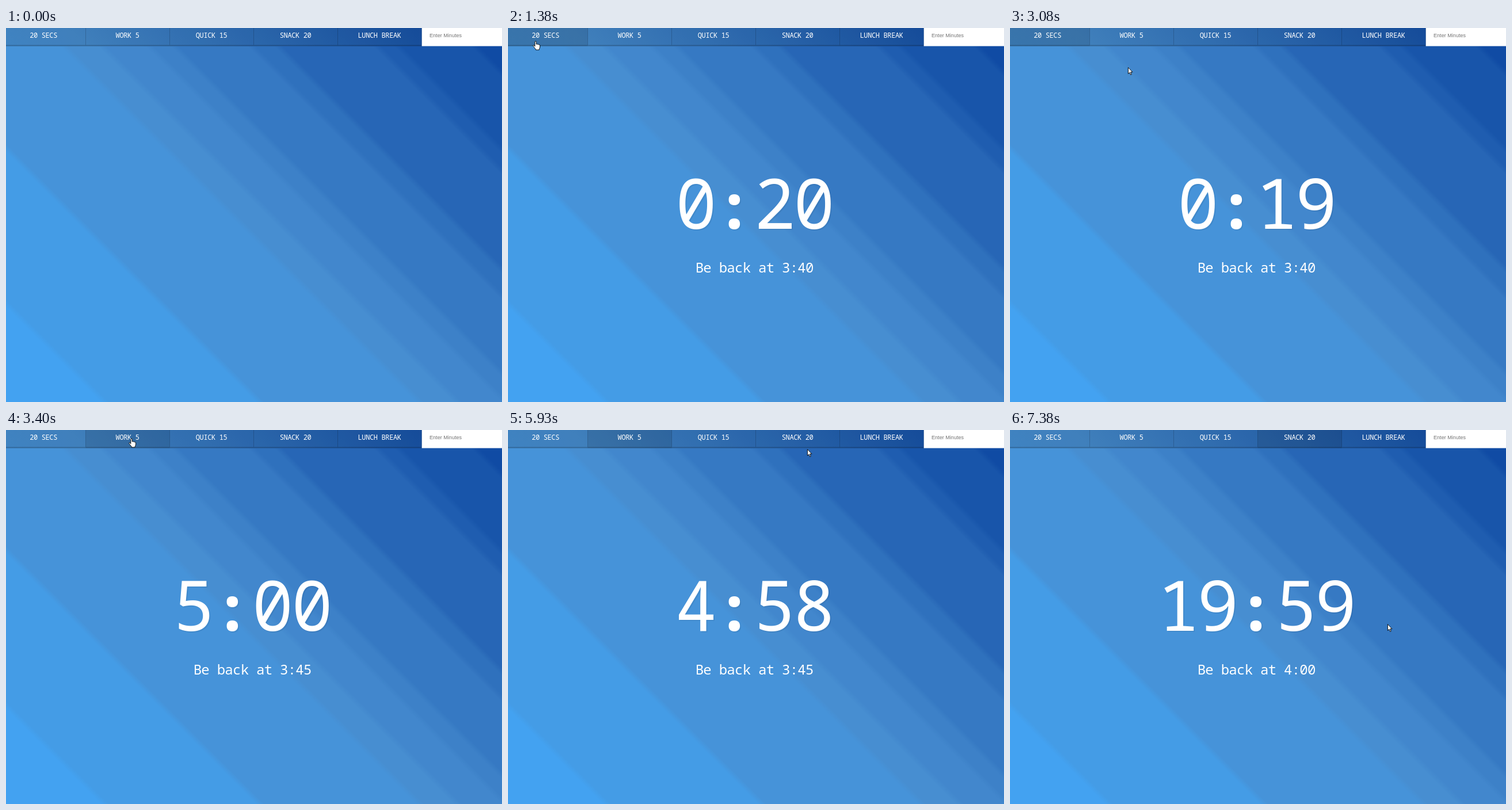
Animation of 862 by 650 pixels, one loop 8000 ms. Source, as an HTML page:

```html
<!DOCTYPE html>
<html lang="en">
<head>
<meta charset="utf-8">
<title>Countdown</title>
<style>
  html, body { margin: 0; width: 100%; height: 100%; overflow: hidden; }
  svg { position: absolute; left: 0; top: 0; }
  text { font-family: "Noto Sans Mono", monospace; fill: #fff; text-anchor: middle; }
  #bar {
    position: absolute; left: 0; top: 0; width: 723px; height: 31.5px;
    background: linear-gradient(45deg, #42a5f5, #478ed1, #0d47a1) 0 0 / 862px 650px;
  }
  .label { font-size: 12px; letter-spacing: -.36px; }
  #clock { font-size: 120px; letter-spacing: -3.7px; filter: drop-shadow(2.7px 2.7px 0 rgba(0,0,0,.06)); }
  #colon { font-size: 108px; font-weight: 700; }
  #back { font-size: 24px; letter-spacing: -.73px; }
  #hint { font: 9.1px "Liberation Sans", Arial, sans-serif; fill: #757575; text-anchor: start; }
  #cursor { fill: #fff; stroke: #000; stroke-width: .9; stroke-linejoin: round; }
</style>
</head>
<body>
<div id="bar"></div>
<svg width="862" height="650" viewBox="0 0 862 650">
  <g id="buttons"></g>
  <rect x="722.7" width="140" height="31.5" fill="#fff"/>
  <text id="hint" x="736" y="16">Enter Minutes</text>
  <text id="clock" x="427.6" y="348.5"><tspan id="mins"></tspan><tspan id="colon" dx="1.6">:</tspan><tspan id="secs" dx="5.6"></tspan></text>
  <text id="back" x="428.2" y="424.5"></text>
  <g id="cursor">
    <path id="arrow" d="M.4.6V11.6L2.9 9.3 4.6 13.3 6.3 12.6 4.6 8.7H8Z"/>
    <path id="hand" d="M-1.2 9V1.2a1.2 1.2 0 0 1 2.4 0V5.2q1.1-.9 2.2.3 1.2-.8 2.1.5 1.7-.5 2 1.2V10q-.1 2-1.3 3.6V15H.2V13.8Q-1.6 12-2.4 10.6L-4 8.4q-.6-1.4.8-1.6 1 .2 2 2.2Z"/>
  </g>
</svg>
<script>
const $ = id => document.getElementById(id);
const LOOP = 8000, BAR = 31.5, STEP = 146, LEFT = -7.5, SPAN = 862 + 650, SOFT = 7;
const lerp = (a, b, k) => a + (b - a) * k;
const ease = k => k * k * (3 - 2 * k);

// Flat diagonal bands, each in the colour of the smooth ramp at its middle.
const edges = [0, 172, 442, 720, 785, 868, 912, 1045, 1092, 1263, 1300, 1433, SPAN];
const ramp = [[66, 165, 245], [71, 142, 209], [13, 71, 161]];
const shade = u => {
  const k = u / SPAN * 2, i = Math.floor(k);
  return `rgb(${ramp[i].map((c, j) => Math.round(lerp(c, ramp[i + 1][j], k - i)))})`;
};
const pct = u => u / SPAN * 100 + '%';
const stops = edges.slice(1).map((end, i) =>
  `${shade((edges[i] + end) / 2)} ${pct(edges[i] + SOFT)} ${pct(end - SOFT)}`);
document.body.style.background = `linear-gradient(45deg, ${stops}) 0 0 / 862px 650px no-repeat`;

$('buttons').innerHTML = ['20 SECS', 'WORK 5', 'QUICK 15', 'SNACK 20', 'LUNCH BREAK'].map((name, i) => {
  const x = LEFT + i * STEP;
  return `<rect class="face" x="${x}" width="${STEP}" height="${BAR}"/>
    <rect x="${x}" y="${BAR - 2}" width="${STEP}" height="2" fill-opacity=".2"/>
    <rect x="${x + STEP - .5}" width="1" height="${BAR - 2}" fill-opacity=".17"/>
    <text class="label" x="${x + STEP / 2 - .4}" y="17">${name}</text>`;
}).join('');
const faces = document.querySelectorAll('.face');

// Pointer strokes: eased curves that start where the last one ended.
const entry = [825, 625];
const strokes = [
  { from: 120, to: 910, bend: [610, 200], end: [128, 24] },
  { from: 960, to: 1380, bend: [40, 8], end: [48, 23] },
  { from: 1550, to: 1930, bend: [160, 180], end: [281, 335] },
  { from: 2800, to: 3190, bend: [167, 150], end: [218, 15] },
  { from: 3780, to: 4020, bend: [265, 300], end: [265, 457] },
  { from: 5370, to: 6160, bend: [550, 2], end: [522, 21] },
  { from: 6670, to: 6900, bend: [560, 200], end: [656, 337] },
];
function pointer(t) {
  let pos = entry;
  for (const { from, to, bend, end } of strokes) {
    if (t < from) break;
    const k = ease(Math.min(1, (t - from) / (to - from)));
    pos = pos.map((p, i) => lerp(lerp(p, bend[i], k), lerp(bend[i], end[i], k), k));
  }
  return pos;
}

// A press focuses its button; the clock appears on release and then ticks each second.
const HOLD = 40, CLOCK = 3 * 60 + 40;
const presses = [
  { at: 1340, button: 0, total: 20 },
  { at: 3360, button: 1, total: 5 * 60 },
  { at: 6340, button: 3, total: 20 * 60 },
];
const latest = t => presses.filter(p => p.at <= t).pop();
const show = (id, on) => $(id).style.display = on ? '' : 'none';
const pair = (n, base) => [Math.floor(n / base), String(n % base).padStart(2, '0')];

function draw(t) {
  const [x, y] = pointer(t), visible = t >= strokes[0].from;
  const hover = visible && y < 31 ? Math.floor((x - LEFT) / STEP) : -1;
  show('cursor', visible);
  show('hand', hover >= 0);
  show('arrow', hover < 0);
  $('cursor').setAttribute('transform', `translate(${Math.round(x)} ${Math.round(y)})`);

  const focus = latest(t), run = latest(t - HOLD);
  faces.forEach((face, i) =>
    face.setAttribute('fill-opacity', i === hover || i === focus?.button ? .2 : .1));

  show('clock', run);
  show('back', run);
  if (run) {
    const left = run.total - Math.floor((t - run.at) / 1000);
    [$('mins').textContent, $('secs').textContent] = pair(left, 60);
    $('back').textContent = 'Be back at ' + pair(CLOCK + Math.floor(run.total / 60), 60).join(':');
  }
}
function frame() {
  draw(performance.now() % LOOP);
  requestAnimationFrame(frame);
}
frame();
</script>
</body>
</html>
```
